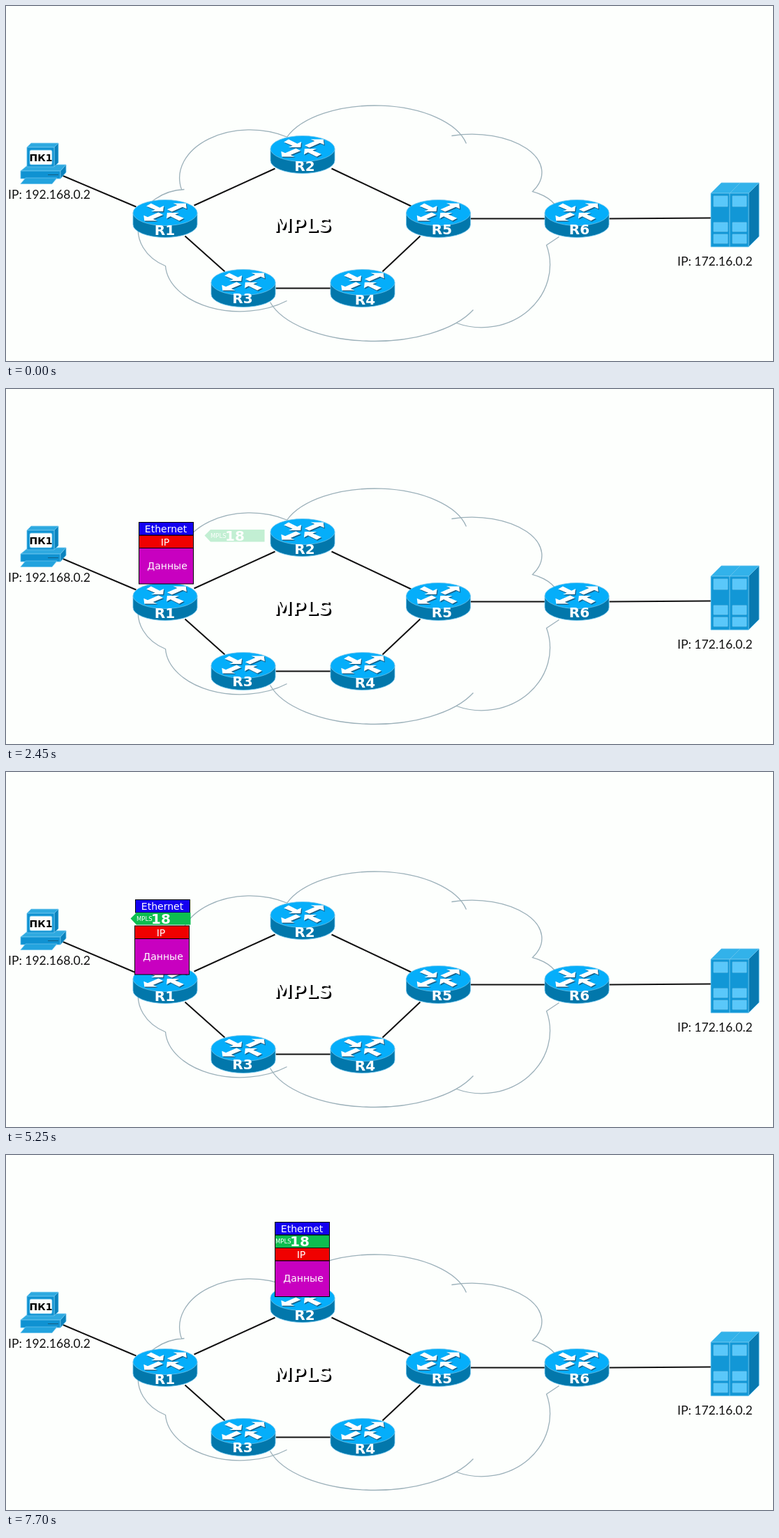
Recreate the animation shown at these times as an HTML page. Size 1099 by 510 pixels, loop 8000 ms.

```html
<!DOCTYPE html>
<html lang="ru">
<head>
<meta charset="utf-8">
<title>MPLS</title>
<style>
  html, body { margin: 0; width: 100%; height: 100%; overflow: hidden; background: #fdfffd; }
  svg { display: block; width: 1099px; height: 510px; }
  text { font-family: "DejaVu Sans", sans-serif; white-space: pre; }
  .bold { font-weight: bold; }
  .address { font: 17.5px Lato, sans-serif; fill: #111; }
  .cloud { fill: none; stroke: #9bb0b9; stroke-width: 1.3; }
  .links { fill: none; stroke: #111; stroke-width: 2; }
  .device { stroke: #6cc4ec; stroke-width: .8; stroke-linejoin: round; }
  .cell { stroke: #000; stroke-width: 1; }
  .packet text { font-size: 14px; fill: #fff; text-anchor: middle; }
  .packet .tag-name { font-size: 8.5px; text-anchor: start; }
  .packet .tag-value { font-size: 20px; text-anchor: start; }
</style>
</head>
<body>
<svg viewBox="0 0 1099 510">
  <defs>
    <path id="inward" d="M-28-10L-21-14L-8-7.5L-2-10.5L-3-2H-21L-15-4.5Z"/>
    <path id="outward" d="M12-14H31L32-6L26-8.5L10-1.5L3-5L18-11.5Z"/>
    <g id="arrowPair"><use href="#inward"/><use href="#outward"/></g>
    <g id="arrows" transform="scale(.96)">
      <use href="#arrowPair"/>
      <use href="#arrowPair" transform="translate(0 -2) rotate(180)"/>
    </g>
    <g id="router">
      <path class="device" fill="#0277ab" d="M-46 0V17A46 18.5 0 0 0 46 17V0Z"/>
      <ellipse class="device" fill="#05aefa" rx="46" ry="18.5"/>
      <use href="#arrows" x="1.2" y="1.5" fill="#17618a"/>
      <use href="#arrows" fill="#fff"/>
    </g>
    <g id="door">
      <path fill="#1297d6" d="M0 269H27V346H0Z"/>
      <path fill="#5ac8fa" d="M4 273H24V288H4ZM4 311H24V324H4ZM4 328H24V341H4Z"/>
    </g>
  </defs>

  <path class="cloud" transform="translate(.5 .5)" d="
    M251 263A101 69.4 0 0 1 403 188
    M255 263A70 58 0 0 0 228 373A107 69 0 0 0 402 423
    M402 188A134 69 0 0 1 659 197
    M638 186A100 55 0 0 1 754 266C768 270 780 277 786 285
    M792 331L774 343A98 90 0 0 1 645 455
    M378 425A155 76 0 0 0 669 436"/>

  <path class="links" transform="translate(.5 .5)" d="
    M80 243L186 288M269 286L385 233M466 233L580 287
    M665 305H772M864 305L1010 304
    M256 330L313 381M386 405H465M539 381L593 330"/>

  <g class="device">
    <path fill="#2ea9e0" d="M21 237L32 228H86L78 237Z"/>
    <path fill="#0f92d2" d="M21 237H78V248H21Z"/>
    <path fill="#0b82bd" d="M78 237L86 228V239L78 248Z"/>
    <path fill="#2ea9e0" d="M30 203L36 197H75L69 203Z"/>
    <path fill="#0b82bd" d="M69 203L75 197V225L69 231Z"/>
    <path fill="#0f92d2" d="M30 203H69V231H30Z"/>
    <rect fill="#fdfffd" x="34" y="207" width="32" height="21" rx="2"/>
    <path fill="#23a3de" d="M28 247H73L66 255.5H21Z"/>
    <path stroke="#16516f" d="M60 242.5H75"/>
  </g>
  <text class="bold" x="50" y="223" font-size="14" text-anchor="middle">ПК1</text>

  <g class="device">
    <path fill="#32b2ea" d="M1010 269L1025 254H1079L1064 269Z"/>
    <path fill="#0879b0" d="M1064 269L1079 254V331L1064 346Z"/>
    <use href="#door" x="1010"/>
    <use href="#door" x="1037"/>
    <path fill="none" d="M1037 269L1052 254"/>
  </g>

  <text class="address" x="3" y="276.5">IP: 192.168.0.2</text>
  <text class="address" x="962" y="373">IP: 172.16.0.2</text>
  <g class="bold" font-size="27">
    <text x="385" y="326">MPLS</text>
    <text x="382.5" y="323.5" fill="#fdfffd">MPLS</text>
  </g>

  <g id="routers"></g>

  <g class="packet">
    <g id="body">
      <rect class="cell" x=".5" y=".5" width="78" height="18.5" fill="#f00000"/>
      <rect class="cell" x=".5" y="19" width="78" height="51.5" fill="#c800c0"/>
      <text x="38" y="15">IP</text>
      <text x="41" y="49">Данные</text>
    </g>
    <g id="ethernet">
      <rect class="cell" x=".5" y=".5" width="78" height="18.5" fill="#1400f0"/>
      <text x="39" y="14.5">Ethernet</text>
    </g>
    <g id="tag">
      <path id="tagArrow" fill="#0dbe50" d="M0 8.5L8.5 0H86V17.5H8.5Z"/>
      <rect id="tagCell" class="cell" fill="#0dbe50" x="8" y=".5" width="78" height="18.5"/>
      <text class="tag-name" x="8.5" y="12">MPLS</text>
      <text class="tag-value bold" x="29.5" y="16">18</text>
    </g>
  </g>
</svg>
<script>
const LOOP = 8000, STEP = 350;
const byId = id => document.getElementById(id);

// centre x, top, label centre x, label baseline
const routers = [
  [228, 278, 227.5, 328.5], [425, 186, 428, 237], [340, 378, 339, 427],
  [511, 378, 514.5, 428.5], [619.5, 278, 624.5, 327.5], [818, 278, 821.5, 328]
];
byId('routers').innerHTML = routers.map(([x, top, labelX, labelY], i) =>
  `<use href="#router" x="${x}" y="${top + 19}"/>
   <text class="bold" x="${labelX}" y="${labelY}" font-size="20" fill="#fff" text-anchor="middle">R${i + 1}</text>`
).join('');

// Left and top of the packet while it travels as one piece
const arriving = [[30, 95], [69, 118], [108, 148], [161, 174], [190, 191]];
const leaving = [[186, 184], [186, 184], [232, 167], [267, 145], [302, 129], [339, 109], [385, 96]];
// Ethernet x, y, body x, y, tag x while the tag is inserted
const inserting = [
  [172, 174, 188, 228.5, 219.5],
  [158, 156, 186, 239.5, 198.5],
  [174, 172, 185, 232, 179.5],
  [185, 183, 184, 220.5, 178.5]
];
const tagFade = [.06, .24, .5, .75, 1];
const FADE = 6, INSERT = 12, SETTLED = INSERT + inserting.length;

function poseAt(step) {
  if (step >= SETTLED) {
    const [x, y] = leaving[step - SETTLED];
    return { ethernet: [x, y], body: [x, y + 37], tag: [x - 7.5, y + 18.5], fade: 1 };
  }
  if (step >= INSERT) {
    const [ex, ey, bx, by, tx] = inserting[step - INSERT];
    return { ethernet: [ex, ey], body: [bx, by], tag: [tx, 202], fade: 1 };
  }
  const [x, y] = arriving[Math.min(step, arriving.length) - 1] || [-200, 0];
  return {
    ethernet: [x, y],
    body: [x, y + 18.5],
    tag: [step === INSERT - 1 ? 269 : 284.5, 202],
    fade: step < FADE ? 0 : tagFade[Math.min(step - FADE, 4)]
  };
}

function draw(now) {
  const step = Math.floor(now % LOOP / STEP);
  const pose = poseAt(step);
  for (const part of ['ethernet', 'body', 'tag'])
    byId(part).setAttribute('transform', `translate(${pose[part]})`);
  byId('tag').setAttribute('opacity', pose.fade);
  const square = step > SETTLED;
  byId('tagArrow').style.display = square ? 'none' : '';
  byId('tagCell').style.display = square ? '' : 'none';
}

const start = performance.now();
function tick() {
  draw(performance.now() - start);
  requestAnimationFrame(tick);
}
tick();
</script>
</body>
</html>
```
